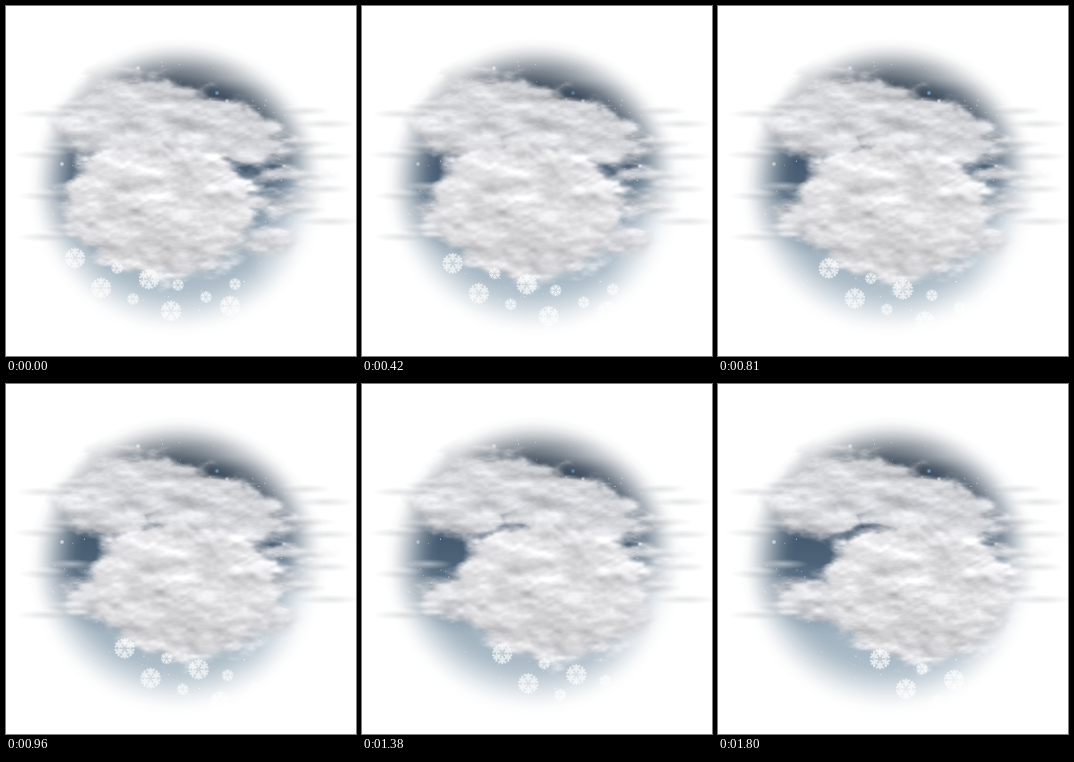
Write an HTML page with a canvas that moves like this. It is 350 px wide and 350 px high and loops after 1.83 s.

```html
<!DOCTYPE html>
<html>
<head>
<meta charset="utf-8">
<style>
html, body { margin: 0; width: 100%; height: 100%; overflow: hidden; background: #fff; }
canvas { display: block; width: 350px; height: 350px; }
</style>
</head>
<body>
<canvas id="stage" width="350" height="350"></canvas>
<script>
const SIZE = 350, LOOP = 1830, STEP = 30;
const stage = document.getElementById('stage').getContext('2d');
const clamp = v => Math.max(0, Math.min(1, v));
const ease = v => v * v * (3 - 2 * v);
const mix = (a, b, t) => a + (b - a) * t;

function randomizer(seed) {
  return () => {
    seed = (seed * 1664525 + 1013904223) >>> 0;
    return seed / 4294967296;
  };
}

function layer(paint) {
  const canvas = document.createElement('canvas');
  canvas.width = canvas.height = SIZE;
  paint(canvas.getContext('2d'));
  return canvas;
}

// Soft ellipse; rgb is a "r,g,b" string
function blob(c, x, y, w, h, rgb, alpha) {
  const g = c.createRadialGradient(0, 0, 0, 0, 0, 1);
  g.addColorStop(0, `rgba(${rgb},${alpha})`);
  g.addColorStop(.5, `rgba(${rgb},${alpha * .5})`);
  g.addColorStop(1, `rgba(${rgb},0)`);
  c.save();
  c.translate(x, y);
  c.scale(w, h);
  c.fillStyle = g;
  c.fillRect(-1, -1, 2, 2);
  c.restore();
}

// Fractal value noise, about 0 to 1
function noise(seed) {
  const rnd = randomizer(seed), grid = Array.from({ length: 4096 }, rnd);
  const at = (x, y) => grid[(y & 63) * 64 + (x & 63)];
  const smooth = (x, y) => {
    const i = Math.floor(x), j = Math.floor(y), u = ease(x - i), v = ease(y - j);
    return mix(mix(at(i, j), at(i + 1, j), u), mix(at(i, j + 1), at(i + 1, j + 1), u), v);
  };
  return (x, y) => {
    let sum = 0;
    for (let o = 0, amp = .53; o < 4; o++, amp /= 2) {
      sum += amp * smooth(x * 2 ** o + o * 17.3, y * 2 ** o + o * 9.7);
    }
    return sum;
  };
}

// Distance inside a tilted ellipse, roughly in pixels
function depth(x, y, [cx, cy, rx, ry, tilt = 0]) {
  const dx = x - cx, dy = y - cy, cos = Math.cos(tilt), sin = Math.sin(tilt);
  return (1 - Math.hypot((dx * cos + dy * sin) / rx, (dy * cos - dx * sin) / ry)) * Math.min(rx, ry);
}

// Ragged cloud mass over some ellipses, lit from above
function clouds(shapes, seed, light, opacity) {
  const field = noise(seed), sample = (x, y) => field(x / 30, y / 15);
  return layer(c => {
    const image = c.createImageData(SIZE, SIZE);
    for (let y = 0, k = 0; y < SIZE; y++) {
      for (let x = 0; x < SIZE; x++, k += 4) {
        const inside = Math.max(...shapes.map(s => depth(x, y, s)));
        if (inside < -20) continue;
        const n = sample(x, y), relief = n - sample(x + 2, y - 5);
        const tone = light + 62 * relief + 75 * (n - .5);
        image.data[k] = image.data[k + 1] = tone;
        image.data[k + 2] = tone + 3;
        image.data[k + 3] = 255 * opacity * ease(clamp((inside + 26 * (n - .5) + 6) / 14));
      }
    }
    c.putImageData(image, 0, 0);
  });
}

const sky = layer(c => {
  const tone = c.createLinearGradient(0, 40, 0, 320);
  ['#3f4b58', '#3c4c5e', '#4e647a', '#a3b4c1', '#bac8d2']
    .forEach((color, i) => tone.addColorStop(i / 4, color));
  c.fillStyle = tone;
  c.fillRect(0, 0, SIZE, SIZE);
  blob(c, 225, 72, 60, 12, '165,172,180', .3);
  blob(c, 300, 225, 65, 75, '226,235,242', .8);

  const rnd = randomizer(41);
  for (let i = 0; i < 170; i++) {
    const a = rnd() * 2 * Math.PI, r = 130 * Math.sqrt(rnd()), d = .5 + rnd() * .7;
    c.fillStyle = `rgba(255,255,255,${.25 + rnd() * .6})`;
    c.fillRect(172 + r * Math.cos(a), 180 + r * Math.sin(a), d, d);
  }
  const mask = c.createRadialGradient(172, 182, 96, 172, 182, 150);
  for (let i = 0; i <= 8; i++) mask.addColorStop(i / 8, `rgba(0,0,0,${1 - ease(i / 8)})`);
  c.globalCompositeOperation = 'destination-in';
  c.fillStyle = mask;
  c.fillRect(0, 0, SIZE, SIZE);
});

const wisps = layer(c => {
  const rnd = randomizer(3);
  const wisp = (x, y) => {
    const w = 22 + rnd() * 10;
    blob(c, x, y - 2, w, 5, '255,255,255', .5);
    blob(c, x, y + 1, w, 5, '140,145,152', .24);
  };
  for (let i = 0; i < 4; i++) {
    wisp(36 + rnd() * 8, 107 + 41 * i);
    wisp(64 + rnd() * 8, 100 + 41 * i);
    wisp(316 + rnd() * 8, 117 + 32.5 * i);
    wisp(294 + rnd() * 8, 104 + 33 * i);
  }
});

// Each ellipse: centre, radii, tilt
const backClouds = clouds([
  [178, 112, 112, 35, .3], [97, 119, 50, 38], [105, 217, 57, 25, .25],
  [266, 168, 28, 6], [267, 197, 30, 12], [258, 238, 32, 14]
], 7, 218, .93);
const frontClouds = clouds([[152, 203, 97, 71, .1]], 29, 224, 1);

function flake(x, y, r) {
  const c = stage;
  c.save();
  c.translate(x, y);
  c.scale(r / 10, r / 10);
  c.globalAlpha = .6;
  c.fillStyle = 'rgba(255,255,255,.45)';
  c.strokeStyle = '#fff';
  c.lineWidth = 1.5;
  c.beginPath();
  c.arc(0, 0, 9.3, 0, 7);
  c.fill();
  c.beginPath();
  for (let i = 0; i < 6; i++) {
    c.rotate(Math.PI / 3);
    c.moveTo(0, 2); c.lineTo(0, 10);
    c.moveTo(-3.6, 9); c.lineTo(0, 6); c.lineTo(3.6, 9);
    c.moveTo(-2.5, 5.6); c.lineTo(0, 3.8); c.lineTo(2.5, 5.6);
  }
  c.stroke();
  c.restore();
}

const bigFlakes = [[69, 252], [95, 282], [143, 273], [165, 305], [224, 300]];
const smallFlakes = [[111, 262], [127, 293], [172, 279], [200, 291], [229, 278]];
const sparks = [[132, 62], [211, 87], [278, 160], [56, 158], [221, 95]];

function draw(now) {
  const p = Math.floor(now % LOOP / STEP) / 60;
  stage.fillStyle = '#fff';
  stage.fillRect(0, 0, SIZE, SIZE);
  stage.drawImage(sky, 0, 0);
  stage.drawImage(backClouds, 0, 0);
  stage.drawImage(wisps, 0, 0);
  stage.drawImage(frontClouds, 46 * p, 6 * p);
  sparks.forEach(([x, y], i) => {
    const glow = .75 + .2 * Math.sin(2 * Math.PI * (2 * p + i * .37));
    blob(stage, x, y, 2.6, 2.6, i == 1 ? '125,190,235' : '240,249,255', glow);
  });
  const drift = r => ([x, y]) => flake(x + 93 * p, y + 23 * p, r);
  bigFlakes.forEach(drift(10.5));
  smallFlakes.forEach(drift(6));
  requestAnimationFrame(draw);
}
draw(0);
</script>
</body>
</html>
```
